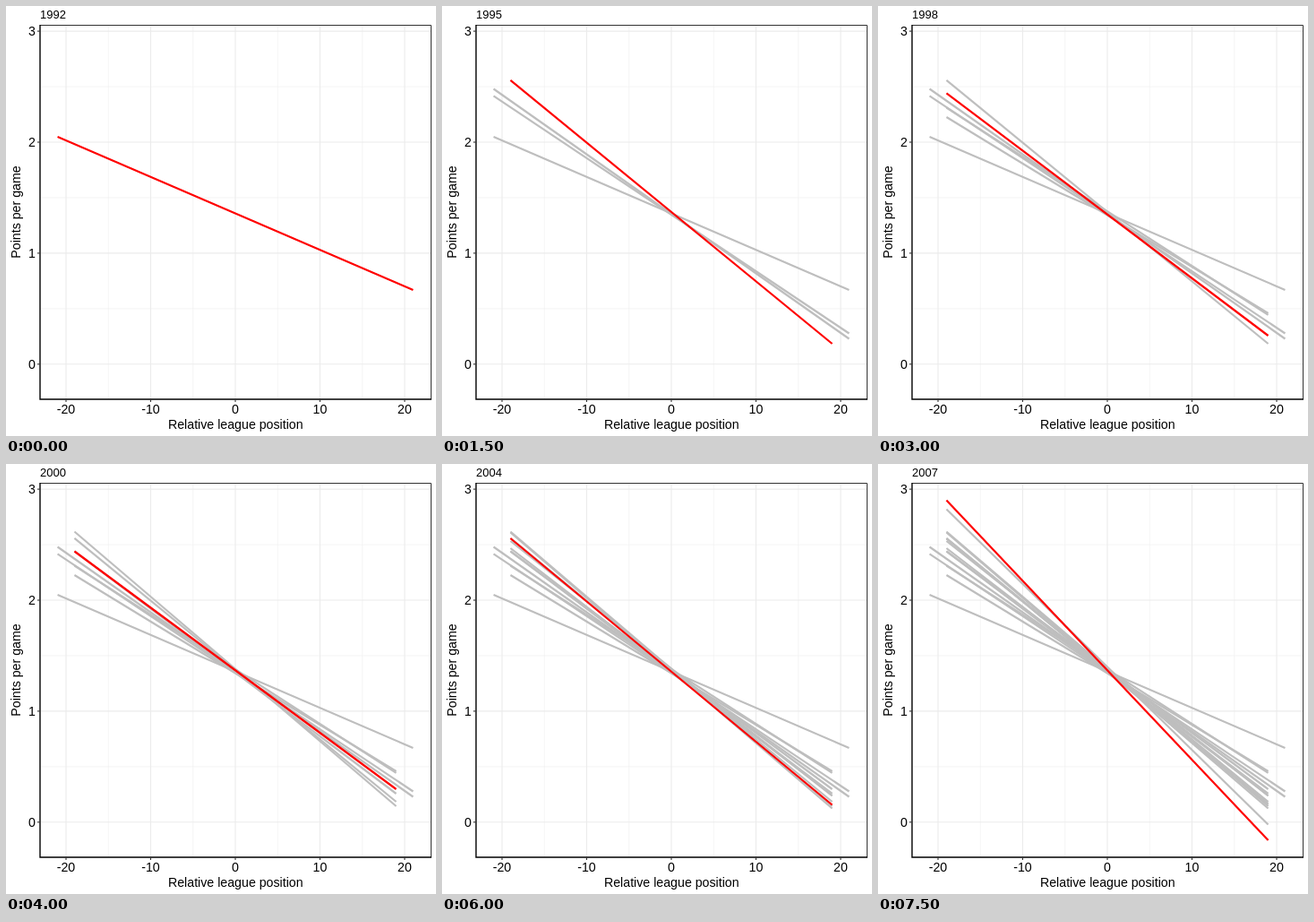
An HTML page that plays this animation: 480x480 px, repeating every 8000 ms.

```html
<!DOCTYPE html>
<html lang="en">
<head>
<meta charset="utf-8">
<title>Points per game by relative league position</title>
<style>
  html, body { margin: 0; width: 100%; height: 100%; overflow: hidden; background: #fff; }
  svg { display: block; width: 100vw; height: 100vh; }
  text { font: 14.2px "Liberation Sans", Arial, sans-serif; fill: #000; }
  #year { font-size: 13px; }
  .mid { text-anchor: middle; }
  .end { text-anchor: end; }
  .major { stroke: #ebebeb; stroke-width: 1.1; }
  .minor { stroke: #ebebeb; stroke-width: .55; }
  .tick { stroke: #333; stroke-width: 1.1; }
  .frame { fill: none; stroke: #333; stroke-width: 1; }
  .axis { fill: none; stroke: #000; stroke-width: 1.4; }
  .fit { stroke: #bebebe; stroke-width: 2.2; }
  .fit.now { stroke: #f00; }
</style>
</head>
<body>
<svg viewBox="0 0 480 480">
  <g id="grid"></g>
  <g id="fits"></g>
  <path class="frame" d="M38 21.5H474.5V439"/>
  <path class="axis" d="M38 21V439H475"/>
  <g id="ticks"></g>
  <text id="year" x="38" y="14"></text>
  <text class="mid" x="256.3" y="472">Relative league position</text>
  <text class="mid" transform="translate(16 230) rotate(-90)">Points per game</text>
</svg>
<script>
  const FIRST_YEAR = 1992, STEP = 500;
  // Per season: largest rank gap, then the line's left and right height in px
  const seasons = [
    [21, 146, 317], [21, 100.3, 365.5], [21, 92.5, 371.5], [19, 82.8, 377],
    [19, 124, 343], [19, 113.5, 344.8], [19, 97.3, 368], [19, 75.5, 382],
    [19, 97.5, 363], [19, 76.5, 384.5], [19, 94, 370], [19, 86, 370.5],
    [19, 83, 380.5], [19, 50.5, 402.5], [19, 83.5, 379], [19, 40.5, 420]
  ];
  const px = v => 256 + v * 9.45;
  const py = v => 399.8 - v * 123.9;
  const byId = id => document.getElementById(id);

  function add(parent, tag, attrs, text = "") {
    const el = document.createElementNS("http://www.w3.org/2000/svg", tag);
    for (const key in attrs) el.setAttribute(key, attrs[key]);
    el.textContent = text;
    return byId(parent).appendChild(el);
  }
  const line = (parent, cls, x1, y1, x2, y2) =>
    add(parent, "line", { class: cls, x1, y1, x2, y2 });
  const vertical = (cls, v) => line("grid", cls, px(v), 22, px(v), 439);
  const horizontal = (cls, v) => line("grid", cls, 38, py(v), 474, py(v));

  for (let v = -15; v <= 15; v += 10) vertical("minor", v);
  for (let v = 0.5; v < 3; v++) horizontal("minor", v);
  for (let v = -20; v <= 20; v += 10) {
    vertical("major", v);
    line("ticks", "tick", px(v), 439, px(v), 442);
    add("ticks", "text", { class: "mid", x: px(v), y: 455 }, v);
  }
  for (let v = 0; v <= 3; v++) {
    horizontal("major", v);
    line("ticks", "tick", 35, py(v), 38, py(v));
    add("ticks", "text", { class: "end", x: 33, y: py(v) + 5.2 }, v);
  }

  const fits = seasons.map(([gap, left, right]) =>
    line("fits", "fit", px(-gap), left, px(gap), right));

  let shown = -1;
  function draw() {
    const index = Math.floor(performance.now() / STEP) % seasons.length;
    if (index !== shown) {
      shown = index;
      byId("year").textContent = FIRST_YEAR + index;
      fits.forEach((fit, i) => {
        fit.style.display = i <= index ? "" : "none";
        fit.classList.toggle("now", i === index);
      });
    }
    requestAnimationFrame(draw);
  }
  draw();
</script>
</body>
</html>
```
